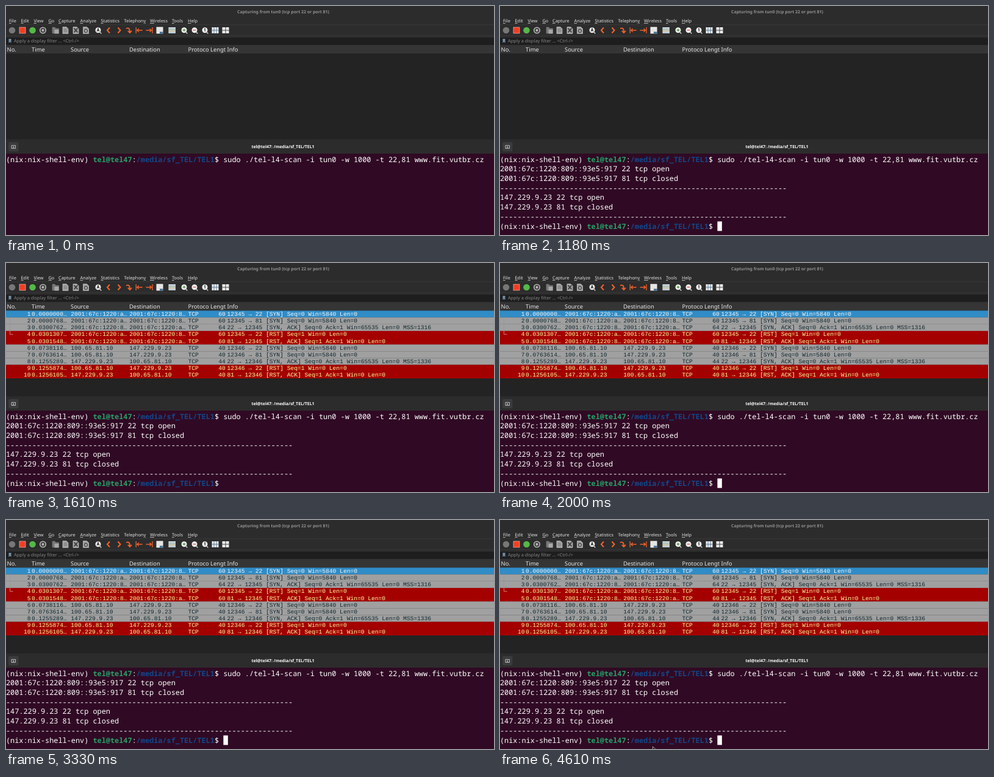
An HTML page for the animation above (4.64 s loop, 800 by 377 pixels).

```html
<!DOCTYPE html>
<html lang="en">
<head>
<meta charset="utf-8">
<title>Port scan and packet capture</title>
<style>
  html, body { margin: 0; width: 100%; height: 100%; overflow: hidden; background: #232323; }
  svg { display: block; width: 800px; height: 377px; }
  text { white-space: pre; text-rendering: geometricPrecision; }
  .ui { font-family: "Noto Sans", "Open Sans", sans-serif; }
  .packet { font: 9.62px "Liberation Mono", "DejaVu Sans Mono", monospace; }
  .term { font: 11.88px "Noto Sans Mono", "DejaVu Sans Mono", monospace; fill: #fff; }
  .bold { font-weight: 700; }
</style>
</head>
<body>
<svg id="stage" viewBox="0 0 800 377" xmlns="http://www.w3.org/2000/svg">
  <g id="capture"></g>
  <g id="packets"></g>
  <g id="terminal"></g>
  <path id="pointer" d="M250.5 373v10l3-3h4.5z" fill="#111" stroke="#ddd" stroke-width=".7"/>
</svg>
<script>
const LOOP = 4640, BLINK = 600;
const CURSOR_ON = 240, ENTER = 680, FIRST_RESULT = 790, SECOND_RESULT = 850, PACKETS = 1240, POINTER = 4560;
const CHAR = 7.128, LINE = 15.72, TERM_TOP = 244.6;

const $ = id => document.getElementById(id);

function add(parent, tag, attrs, content) {
  const node = document.createElementNS("http://www.w3.org/2000/svg", tag);
  for (const key in attrs) node.setAttribute(key, attrs[key]);
  if (content !== undefined) node.textContent = content;
  parent.appendChild(node);
  return node;
}
const rect = (g, x, y, width, height, fill, more) => add(g, "rect", { x, y, width, height, fill, ...more });
const path = (g, d, stroke, width = 1, fill = "none") => add(g, "path", { d, stroke, "stroke-width": width, fill });
const circle = (g, cx, cy, r, fill, more) => add(g, "circle", { cx, cy, r, fill, ...more });
const label = (g, x, y, size, fill, content, more) =>
  add(g, "text", { x, y, "font-size": size, fill, class: "ui", ...more }, content);

function drawMenu(g) {
  const items = [[5, "File"], [24.5, "Edit"], [45.5, "View"], [69.5, "Go"], [86, "Capture"], [121.5, "Analyze"],
    [155.5, "Statistics"], [193.5, "Telephony"], [236, "Wireless"], [272, "Tools"], [298, "Help"]];
  for (const [x, name] of items) {
    const text = label(g, x, 27, 7.35, "#e4e4e4", "");
    const key = name === "Telephony" ? name.length - 1 : 0;
    [...name].forEach((c, i) => add(text, "tspan", i === key ? { "text-decoration": "underline" } : {}, c));
  }
}

function drawSheet(g, x) {
  path(g, `M${x - 4.5} 34.5h6l3 3v8h-9z`, "#c4c4c4", .7, "#a4a4a4");
  path(g, `M${x - 3} 38h5m-5 2h6m-6 2h6`, "#666", .7);
}

function drawLens(g, x, sign, color) {
  path(g, `M${x + 3} 43l2.3 2.5`, "#ccc", 1.5);
  circle(g, x, 39.7, 4.5, "#f2f2f2");
  path(g, sign, color, 1.2);
}

function drawToolbar(g) {
  const orange = "#f0622d";
  circle(g, 10, 40, 5.3, "#777");
  rect(g, 22, 35, 10, 10, "#ee3f26", { stroke: "#e8a79c", "stroke-width": .8 });
  circle(g, 43.5, 40, 5.3, "#55b848");
  circle(g, 60.5, 40, 4.8, "#444", { stroke: "#b5b5b5", "stroke-width": 1.6 });
  circle(g, 60.5, 40, 1.9, "#bbb");

  path(g, "M76 45V35h4l1.5 2h5v8z", "#777", .7, "#777");
  rect(g, 79.5, 39, 7, 6.5, "#a8a8a8");
  [97.5, 114.5, 131].forEach(x => drawSheet(g, x));
  path(g, "M111.5 36.5l6 7m0-7l-6 7", "#333", 1.3);
  circle(g, 131, 41, 2.6, "#a4a4a4", { stroke: "#333", "stroke-width": 1 });

  drawLens(g, 151, "M149.2 42l1.8-5l1.8 5m-3-1.6h2.4", "#333");
  path(g, "M170 35.5l-4 4.5l4 4.5", orange, 2.1);
  path(g, "M183.5 35.5l4 4.5l-4 4.5", orange, 2.1);
  path(g, "M197 37.2q6-3 6 6m-3.2-2.3l3.2 3.3l3-3.3", orange, 1.8);
  path(g, "M213.2 35v10m1.5-5h9m-6-2.8l-3 2.8l3 2.8", orange, 1.3);
  path(g, "M240 35v10m-1.5-5h-9m6-2.8l3 2.8l-3 2.8", orange, 1.3);

  rect(g, 246.5, 34.5, 11, 11, "#ededed");
  path(g, "M247.5 37h9m-9 2.3h9m-9 2.3h9", "#ccc", .6);
  rect(g, 252, 42.5, 5.5, 3, "#426b91");
  rect(g, 266.5, 35, 11.5, 10, "#e6e6e6");
  ["#9bb5ca", "#85a98a", "#bdad84", "#9bb5ca"].forEach((c, i) => rect(g, 266.5, 36.2 + i * 2.3, 11.5, 1.2, c));

  drawLens(g, 292, "M289.6 39.7h4.8m-2.4-2.4v4.8", "#3f8f35");
  drawLens(g, 309, "M306.6 39.7h4.8", "#d23a2a");
  drawLens(g, 326, "M325 38l1.2-.7v4.8", "#333");
  rect(g, 337.5, 35, 11, 10, "#eee");
  path(g, "M341 35v10m4-10v10M337.5 40h11", "#496d8f", .9);
  rect(g, 354.5, 35, 11, 10, "#eee");
  path(g, "M360 35v10M354.5 40h11", "#444", 1);
}

function drawCapture() {
  const g = $("capture");
  rect(g, 0, 0, 800, 377, "#232323");
  rect(g, 0, 0, 800, 51, "#2c2c2c");
  path(g, "M0 30.8h800M0 48.8h800", "#3c3c3c", .8);
  label(g, 454.5, 11.5, 6.95, "#929292", "Capturing from tun0 (tcp port 22 or port 81)",
    { "text-anchor": "middle", "font-weight": 700 });
  drawMenu(g);
  drawToolbar(g);
  rect(g, 0, 51, 800, 14, "#1e1e1e");
  path(g, "M0 51.5h800M0 64.5h800", "#393939", .7);
  path(g, "M4.5 54h4v7l-2-2l-2 2z", "none", 0, "#728ea8");
  label(g, 13, 60.3, 7.48, "#858585", "Apply a display filter … <Ctrl-/>");
  rect(g, 0, 65, 800, 13, "#353535");
  const columns = [[1.5, "No."], [42, "Time"], [106, "Source"], [202, "Destination"],
    [298.5, "Protoco"], [335, "Lengt"], [362.5, "Info"]];
  for (const [x, name] of columns) label(g, x, 75.2, 9.4, "#e6e6e6", name);
}

function drawPackets() {
  const g = $("packets"), pitch = 11.15, top = 78.4;
  const v6 = ["2001:67c:1220:a…", "2001:67c:1220:8…"], v4 = ["100.65.81.10", "147.229.9.23"];
  const syn = "[SYN] Seq=0 Win=5840 Len=0";
  const ack = "[SYN, ACK] Seq=0 Ack=1 Win=65535 Len=0 MSS=";
  const rst = "[RST] Seq=1 Win=0 Len=0";
  const rstAck = "[RST, ACK] Seq=1 Ack=1 Win=0 Len=0";
  const exchange = (pair, port, size, mss, times) => [
    [0, size, `${port} → 22 ${syn}`],
    [0, size, `${port} → 81 ${syn}`],
    [1, size + 4, `22 → ${port} ${ack}${mss}`],
    [0, size, `${port} → 22 ${rst}`],
    [1, size, `81 → ${port} ${rstAck}`]
  ].map(([from, length, info], i) => [times[i], pair[from], pair[1 - from], length, info]);
  const rows = [
    ...exchange(v6, 12345, 60, 1316, ["0.0000000…", "0.0000768…", "0.0300762…", "0.0301307…", "0.0301548…"]),
    ...exchange(v4, 12346, 40, 1336, ["0.0738116…", "0.0763614…", "0.1255289…", "0.1255874…", "0.1256105…"])
  ];
  rows.forEach(([time, source, destination, length, info], i) => {
    const y = top + i * pitch, red = info.includes("[RST");
    const back = i === 0 ? "#308cc6" : red ? "#a40000" : "#a0a0a0";
    const fill = i === 0 ? "#f4f8fb" : red ? "#fffc9c" : "#12272e";
    rect(g, 0, y, 800, pitch + .1, back);
    const cell = (x, content, anchor = "start") =>
      add(g, "text", { x, y: y + 8.6, fill, class: "packet", "text-anchor": anchor }, content);
    cell(40.5, i + 1, "end");
    cell(42, time);
    cell(106.3, source);
    cell(202.3, destination);
    cell(298.5, "TCP");
    cell(359.8, length, "end");
    cell(362.6, info);
  });
  path(g, "M6.5 84v28", "#8b8b8b", .7).setAttribute("stroke-dasharray", "1 1");
  path(g, "M6.5 112v5.5h5", "#d99a80", .8);
}

const lineTop = row => TERM_TOP + row * LINE;

function termLine(g, row, ...parts) {
  const text = add(g, "text", { x: 0, y: lineTop(row) + 11.9, class: "term" });
  for (const [content, fill = "#fff", bold] of parts)
    add(text, "tspan", bold ? { fill, class: "bold" } : { fill }, content);
}

const prompt = (g, row, command = "") => termLine(g, row, ["(nix:nix-shell-env) "],
  ["tel@tel47", "#26a269", true], [":"], ["/media/sf_TEL/TEL1", "#12488b", true], ["$ " + command]);

function result(g, row, address) {
  termLine(g, row, [address + " 22 tcp open"]);
  termLine(g, row + 1, [address + " 81 tcp closed"]);
  termLine(g, row + 2, ["-".repeat(66)]);
}

function drawTerminal() {
  const g = $("terminal");
  rect(g, 0, 219.5, 800, 24, "#2c2c2c");
  rect(g, 4, 224, 16.5, 15.5, "#3b3b3b", { rx: 2.5 });
  path(g, "M9 234.5v-5h6.5v5zM12.2 231v2.6m-1.3-1.3h2.6", "#ddd", .8);
  label(g, 454, 234, 6.95, "#fff", "tel@tel47: /media/sf_TEL/TEL1", { "text-anchor": "middle", "font-weight": 700 });
  rect(g, 0, 243, 800, 134, "#300a24");
  prompt(g, 0, "sudo ./tel-l4-scan -i tun0 -w 1000 -t 22,81 www.fit.vutbr.cz");
  const first = add(g, "g", {}), second = add(g, "g", {});
  result(first, 1, "2001:67c:1220:809::93e5:917");
  result(second, 4, "147.229.9.23");
  prompt(second, 7);
  const cursor = rect(g, 0, 0, CHAR + .3, LINE, "#fff");
  return { first, second, cursor };
}

drawCapture();
drawPackets();
const { first, second, cursor } = drawTerminal();

const show = (node, on) => node.setAttribute("visibility", on ? "visible" : "hidden");

function cursorCell(t) {
  if (t < ENTER) return [110, 0];
  if (t < FIRST_RESULT) return [0, 1];
  return t < SECOND_RESULT ? [0, 4] : [50, 7];
}

function render(t) {
  show(first, t >= FIRST_RESULT);
  show(second, t >= SECOND_RESULT);
  show($("packets"), t >= PACKETS);
  show($("pointer"), t >= POINTER);
  const [column, row] = cursorCell(t);
  cursor.setAttribute("x", column * CHAR);
  cursor.setAttribute("y", lineTop(row));
  // Pressing enter restarts the blink.
  show(cursor, t < ENTER ? t >= CURSOR_ON : (t - ENTER) % (2 * BLINK) < BLINK);
}

const start = performance.now();
function tick() {
  render((performance.now() - start) % LOOP);
  requestAnimationFrame(tick);
}
tick();
</script>
</body>
</html>
```
